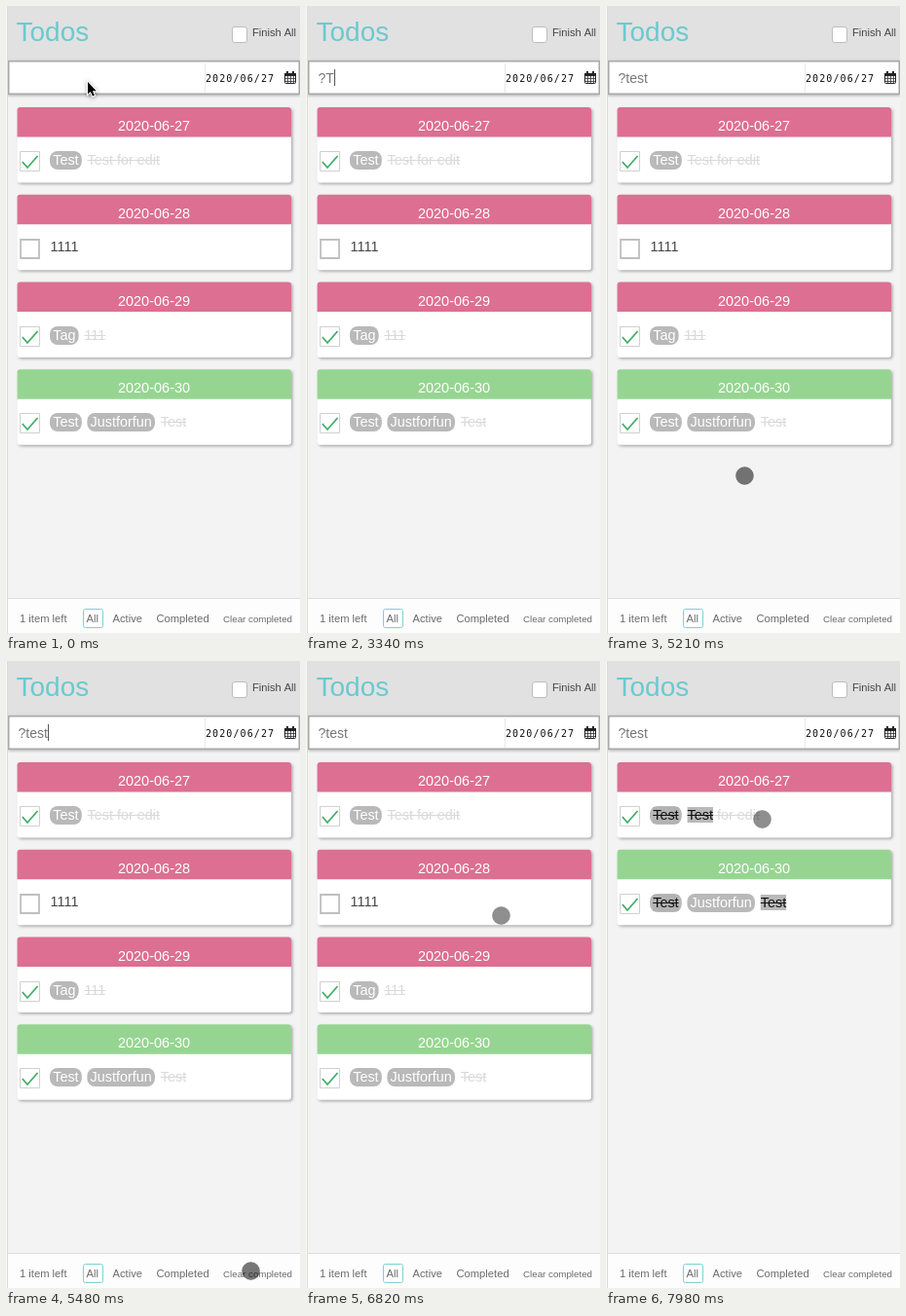
Recreate the animation shown at these times as an HTML page with a canvas. Size 302x644 px, loop 8 s.

```html
<!DOCTYPE html>
<html lang="en">
<head>
<meta charset="utf-8">
<title>Todos</title>
<style>
html, body { margin: 0; width: 100%; height: 100%; overflow: hidden; background: #f3f3f3; }
canvas { display: block; width: 302px; height: 644px; }
</style>
</head>
<body>
<canvas id="stage"></canvas>
<script>
const W = 302, H = 644, LOOP = 8000;
const SANS = '"Liberation Sans", Arial, sans-serif';
const MONO = '"DejaVu Sans Mono", monospace';
const PINK = '#dc6f92', GREEN = '#96d591', CYAN = '#6cc9d0';
const FAINT = '#d9d9d9', TAG = '#b9b9b9', DARK = '#454545';
const canvas = document.getElementById('stage');
const ctx = canvas.getContext('2d');
const ratio = window.devicePixelRatio || 1;
canvas.width = W * ratio;
canvas.height = H * ratio;

// [time, value]: the last entry reached is the current one
const TYPED = [[0, ''], [680, '?'], [1700, '?T'], [1940, '?Te'], [2150, '?Tes'], [2360, '?Test'],
  [3020, '?Tes'], [3130, '?Te'], [3340, '?T'], [3580, '?'],
  [4090, '?t'], [4150, '?te'], [4300, '?tes'], [4390, '?test']];
const CARET = [[0, 0], [680, 1], [1190, 0], [1700, 1], [2870, 0], [3020, 1], [3850, 0], [4090, 1],
  [4890, 0], [5390, 1], [5820, 0], [6320, 1], [6820, 0], [7290, 1], [7790, 0]];
const POINTER = [[0, 'arrow'], [500, ''], [800, 'touch'], [1610, ''], [1820, 'touch'], [1940, ''],
  [4830, 'press'], [6400, 'touch']];

// pointer path: [time, x, y]
const PATH = [[4830, 84.5, 89.5], [4915, 110, 270], [5000, 142, 482], [5210, 142, 482],
  [5380, 269, 608], [5480, 251.5, 626.5], [5640, 255, 635], [5970, 255, 635], [6210, 253.5, 631.5],
  [6400, 222, 470], [6580, 200.5, 261.5], [7500, 200.5, 261.5], [7660, 188, 322],
  [7980, 160.5, 162.5]];

const CARDS = [
  { date: '2020-06-27', color: PINK, done: true, tags: ['Test'], title: 'Test for edit' },
  { date: '2020-06-28', color: PINK, done: false, tags: [], title: '1111' },
  { date: '2020-06-29', color: PINK, done: true, tags: ['Tag'], title: '111' },
  { date: '2020-06-30', color: GREEN, done: true, tags: ['Test', 'Justforfun'], title: 'Test' }
];

function at(list, t) {
  let value = list[0][1];
  for (const [time, v] of list) if (t >= time) value = v;
  return value;
}

function pointerAt(t) {
  if (t < PATH[0][0]) return [84.5, 78.5];
  for (let i = 1; i < PATH.length; i++) {
    const a = PATH[i - 1], b = PATH[i];
    if (t > b[0]) continue;
    const k = (t - a[0]) / (b[0] - a[0]);
    const s = k * k * (3 - 2 * k) * 0.4 + k * 0.6;
    return [a[1] + (b[1] - a[1]) * s, a[2] + (b[2] - a[2]) * s];
  }
  return PATH[PATH.length - 1].slice(1);
}

function rect(x, y, w, h, color) {
  ctx.fillStyle = color;
  ctx.fillRect(x, y, w, h);
}

function round(x, y, w, h, r, fill, stroke, line = 1) {
  ctx.beginPath();
  ctx.roundRect(x, y, w, h, r);
  if (fill) { ctx.fillStyle = fill; ctx.fill(); }
  if (stroke) { ctx.strokeStyle = stroke; ctx.lineWidth = line; ctx.stroke(); }
}

function shadow(color, blur, x, y) {
  ctx.shadowColor = color;
  ctx.shadowBlur = blur * ratio;
  ctx.shadowOffsetX = x * ratio;
  ctx.shadowOffsetY = y * ratio;
}

const noShadow = () => shadow('transparent', 0, 0, 0);

function measure(str, size) {
  ctx.font = size + 'px ' + SANS;
  return ctx.measureText(str).width;
}

function text(str, x, y, size, color, align = 'left') {
  ctx.font = size + 'px ' + SANS;
  ctx.textAlign = align;
  ctx.fillStyle = color;
  ctx.fillText(str, x, y);
}

function struck(str, x, y, color) {
  const w = measure(str, 14.4);
  text(str, x, y, 14.4, color);
  rect(x, Math.round(y - 5), w, 1, color);
}

function drawHeader() {
  rect(0, 0, W, 56, '#e1e1e1');
  text('Todos', 10.5, 35.5, 28, CYAN);
  round(232.5, 21.5, 15, 16, 2.5, '#fff', '#bdbdbd');
  text('Finish All', 253, 31, 11.1, '#454545');
}

function drawCalendar(x, y) {
  round(x + 0.5, y + 2.5, 11, 10, 1, '#fff', '#222');
  rect(x, y + 2, 12, 3, '#222');
  rect(x + 2, y, 2, 3, '#222');
  rect(x + 8, y, 2, 3, '#222');
  for (let i = 1; i < 4; i++) rect(x + i * 3, y + 5, 0.8, 8, '#333');
  for (let i = 0; i < 2; i++) rect(x + 1, y + 7 + i * 3, 10, 0.8, '#333');
}

function drawInput(t) {
  shadow('rgba(0,0,0,.3)', 3, 0, 1);
  rect(2, 56, 300, 35, '#a9a9a9');
  noShadow();
  rect(3.5, 57.5, 297, 32, '#fff');
  rect(204, 59, 1, 30, '#e8e8e8');
  const typed = at(TYPED, t);
  text(typed, 12.5, 79, 14, '#777');
  if (at(CARET, t)) rect(Math.round(12.5 + measure(typed, 14)), 65, 1, 17, '#555');
  ctx.font = '10px ' + MONO;
  ctx.textAlign = 'left';
  ctx.fillStyle = '#111';
  ctx.letterSpacing = '1.1px';
  ctx.fillText('2020/06/27', 205, 78);
  ctx.letterSpacing = '0px';
  drawCalendar(286, 67);
}

function drawCheck(y, done) {
  if (!done) {
    round(15, y + 1, 19, 19, 0, '#fff', '#bfbfbf', 1.8);
    return;
  }
  round(14.5, y + 0.5, 20, 20, 0, '#fff', '#d0d0d0');
  ctx.beginPath();
  ctx.moveTo(16.8, y + 11);
  ctx.lineTo(22, y + 17);
  ctx.lineTo(32.5, y + 5);
  ctx.strokeStyle = '#41ae66';
  ctx.lineWidth = 1.8;
  ctx.stroke();
}

function drawTag(str, x, base, found) {
  const w = measure(str, 14.4);
  round(x, base - 14, w + 6.4, 19, 8, TAG);
  if (found) {
    rect(x + 3.2, base - 13, w, 17, '#b2b2b2');
    struck(str, x + 3.2, base, '#111');
  } else {
    text(str, x + 3.2, base, 14.4, '#fff');
  }
  return x + w + 6.4;
}

function drawTitle(card, x, base, search) {
  if (!card.done) {
    text(card.title, x, base, 14.4, DARK);
    return;
  }
  if (!search) {
    struck(card.title, x, base, FAINT);
    return;
  }
  const w = measure('Test', 14.4);
  rect(x, base - 13, w, 16, TAG);
  struck('Test', x, base, '#111');
  struck(card.title.slice(4), x + w, base, FAINT);
}

function drawCard(card, i, search) {
  const y = 104 + i * 89.75, top = Math.round(y), base = top + 59;
  shadow('rgba(0,0,0,.3)', 3, 1.5, 1.5);
  round(11.5, y, 281.5, 77.5, 3, '#fff');
  noShadow();
  round(11.5, y, 281.5, 30.5, [3, 3, 0, 0], card.color);
  text(card.date, 152, top + 24, 14.5, '#fff', 'center');
  drawCheck(top + 45, card.done);
  let x = 45;
  for (const tag of card.tags) x = drawTag(tag, x, base, search && tag === 'Test') + 5.6;
  drawTitle(card, x + (card.tags.length ? 0.2 : 0.6), card.done ? base : base - 1, search);
}

function drawFooter() {
  rect(0, 609, W, 35, '#fdfdfd');
  rect(0, 608, W, 1, '#dedede');
  const y = 633;
  text('1 item left', 14, y, 11.2, '#6b6b6b');
  round(79.5, 619.5, 20, 19, 2, '#fff', '#7fcfd6');
  text('All', 82.5, y, 11.2, '#6b6b6b');
  text('Active', 109.5, y, 11.2, '#6b6b6b');
  text('Completed', 154.5, y, 11.2, '#6b6b6b');
  text('Clear completed', 223, y, 9.75, '#6b6b6b');
}

function drawArrow(x, y) {
  const pts = [[0, 0], [0, 12.5], [2.9, 9.9], [4.9, 14.6], [6.9, 13.7], [4.9, 9.2], [8.8, 9.2]];
  ctx.beginPath();
  for (const [px, py] of pts) ctx.lineTo(x + px, y + py);
  ctx.closePath();
  ctx.strokeStyle = '#fff';
  ctx.lineWidth = 2;
  shadow('rgba(0,0,0,.4)', 4, 0, 1);
  ctx.stroke();
  noShadow();
  ctx.fillStyle = '#000';
  ctx.fill();
}

function drawPointer(t) {
  const kind = at(POINTER, t);
  if (!kind) return;
  if (kind === 'arrow') {
    drawArrow(84, 78);
    return;
  }
  const [x, y] = pointerAt(t);
  ctx.beginPath();
  ctx.arc(x, y, 9.2, 0, Math.PI * 2);
  ctx.fillStyle = kind === 'press' ? 'rgba(0,0,0,.53)' : 'rgba(0,0,0,.44)';
  ctx.fill();
  ctx.strokeStyle = 'rgba(0,0,0,.1)';
  ctx.lineWidth = 0.8;
  ctx.stroke();
}

function draw(t) {
  const search = t >= 6990;
  ctx.setTransform(ratio, 0, 0, ratio, 0, 0);
  rect(0, 0, W, H, '#f3f3f3');
  drawHeader();
  drawInput(t);
  const shown = search ? CARDS.filter(c => /test/i.test(c.title)) : CARDS;
  shown.forEach((card, i) => drawCard(card, i, search));
  drawFooter();
  rect(0, 0, 1, H, '#f8f8f8');
  rect(1, 0, 1, H, '#dcdcdc');
  drawPointer(t);
}

const start = performance.now();
function frame() {
  draw((performance.now() - start) % LOOP);
  requestAnimationFrame(frame);
}
frame();
</script>
</body>
</html>
```
